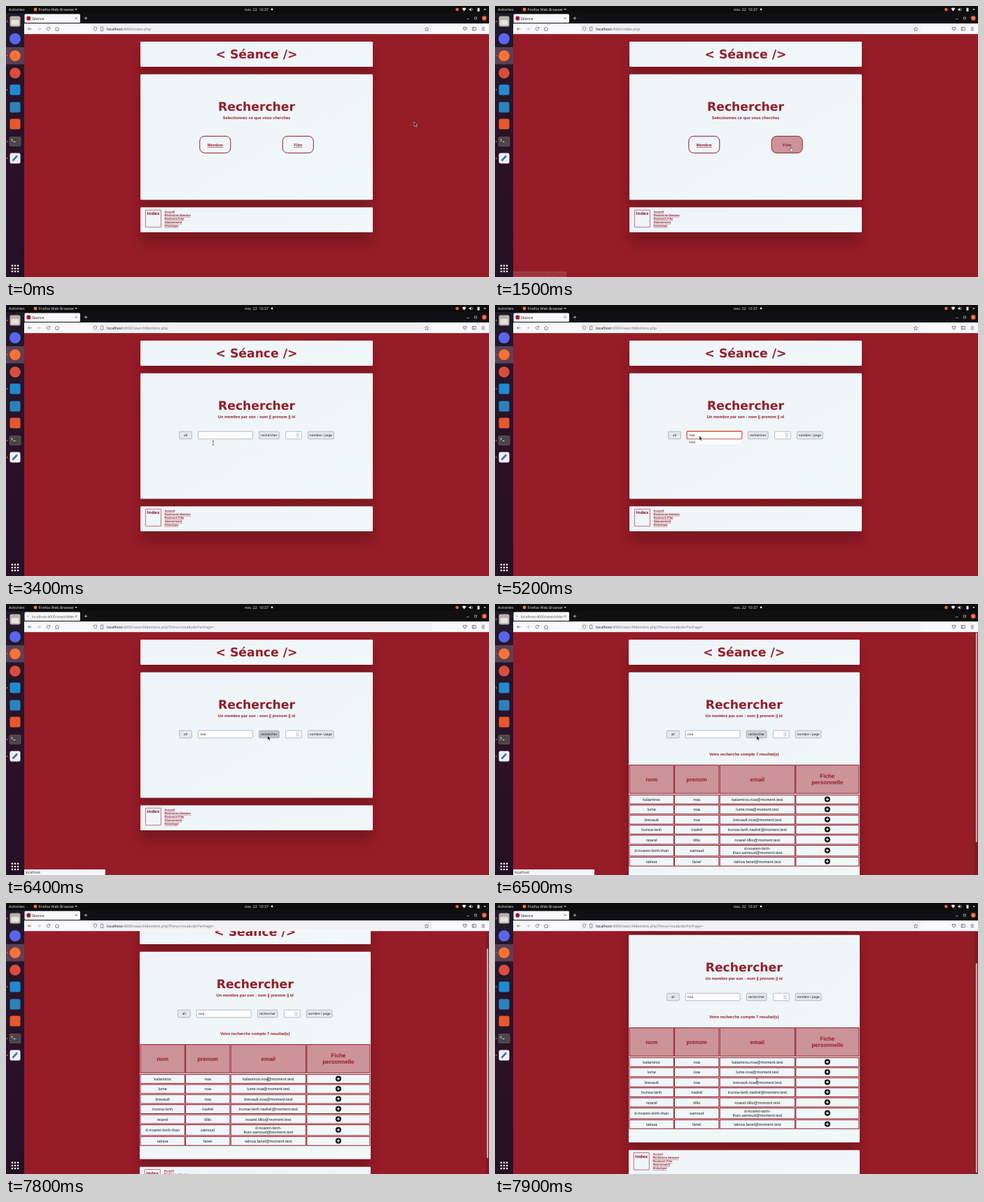
These frames come from a looping animation (690x388 px, 8 s). An HTML page:

```html
<!DOCTYPE html>
<html lang="fr">
<head>
<meta charset="utf-8">
<title>Séance</title>
<style>
html, body { margin: 0; width: 100%; height: 100%; overflow: hidden; background: #961c28; }
svg { display: block; width: 100vw; height: 100vh; }
text { font-family: "Noto Sans", "Open Sans", sans-serif; text-rendering: geometricPrecision; white-space: pre; }
.page { font-family: "Liberation Sans", Arial, sans-serif; fill: #222; }
.bold { font-family: "Liberation Sans", Arial, sans-serif; font-weight: 700; fill: #961c28; }
.title { font-family: "DejaVu Sans", sans-serif; font-weight: 700; fill: #961c28; }
.link { text-decoration: underline; }
.mid { text-anchor: middle; }
</style>
</head>
<body>
<svg viewBox="0 0 690 388" preserveAspectRatio="none">
  <defs>
    <linearGradient id="dockFill" x2="0" y2="1"><stop stop-color="#201a29"/><stop offset=".55" stop-color="#2b1128"/><stop offset="1" stop-color="#241024"/></linearGradient>
    <linearGradient id="panelFill" x2="1" y2="1"><stop stop-color="#eef4fa"/><stop offset="1" stop-color="#f0f8f8"/></linearGradient>
    <filter id="blur" x="-20%" y="-60%" width="140%" height="220%"><feGaussianBlur stdDeviation="8"/></filter>
    <clipPath id="viewport"><path d="M26 40H690V388H26Z"/></clipPath>
    <clipPath id="tabClip"><path d="M28 11H97V25H28Z"/></clipPath>
  </defs>
  <g id="page" clip-path="url(#viewport)"></g>
  <g id="desktop"></g>
  <g id="browser"></g>
  <g id="pointer"></g>
</svg>
<script>
const LOOP = 8000, STEP = 100;
const RED = '#961c28', PINK = '#cb9499';
const QUERY = 'noa';
const HOST = 'localhost';
const MAIL = '@moment.test';

const layer = id => document.getElementById(id);
const rect = (x, y, w, h, fill, extra = '') =>
  `<rect x="${x}" y="${y}" width="${w}" height="${h}" fill="${fill}" ${extra}/>`;
const circle = (x, y, r, fill, extra = '') => `<circle cx="${x}" cy="${y}" r="${r}" fill="${fill}" ${extra}/>`;
const line = (d, color, width = .7, extra = '') =>
  `<path d="${d}" fill="none" stroke="${color}" stroke-width="${width}" ${extra}/>`;
const text = (x, y, str, size, cls = '', extra = '') =>
  `<text x="${x}" y="${y}" font-size="${size}" class="${cls}" ${extra}>${str.replace(/&/g, '&amp;').replace(/</g, '&lt;')}</text>`;
const shift = (x, y, body) => `<g transform="translate(${x} ${y})">${body}</g>`;

// Desktop

function desktop() {
  const topBar = rect(0, 0, 690, 10, '#0c0c0c') +
    text(4, 7, 'Activities', 5.4, '', 'fill="#e6e6e6"') + circle(42, 5, 2.4, '#f57a2c') +
    text(46.5, 7, 'Firefox Web Browser', 5.25, '', 'fill="#e6e6e6"') +
    '<path d="M98.500 4h3.400l-1.700 2z" fill="#ddd"/>' +
    text(358, 7, 'nov. 22  10:37', 5.3, 'mid', 'fill="#e6e6e6"') + circle(380, 4.8, 1.4, '#eee') +
    circle(644.500, 5, 2.300, '#e8663a') +
    '<path d="M651.500 3.800q3-2.400 6 0l-3 3.800zM661.500 4h1.400l1.700-1.500v5l-1.700-1.500h-1.400zM673.500 2.700h3v5h-3zM682.300 4.200h3.400l-1.700 2z" fill="#e6e6e6"/>' +
    line('M666 3.300q1.500 1.700 0 3.400', '#ddd', .6);

  const dots = [22, 71, 120, 194, 218].map(y => circle(1.8, y, 1, '#e2572f')).join('');
  const square = (y, fill) => rect(5.500, y - 7.500, 15, 15, fill, 'rx="2.5"');
  const grid = [0, 1, 2].flatMap(i => [0, 1, 2].map(j =>
    rect(7.7 + i * 4.1, 370.600 + j * 4.1, 2.400, 2.400, '#f0edf0', 'rx=".7"'))).join('');
  const dock = rect(0, 10, 26, 378, 'url(#dockFill)') + rect(0, 59, 26, 24.5, '#5a4156') +
    square(22, '#b9b2aa') + rect(7.500, 20, 11, 7.500, '#e7e2dc', 'rx="1"') +
    circle(13, 47, 8, '#5865f2') + circle(13, 71.300, 7.800, '#ff7131') + circle(13, 96, 7.800, '#dd4b3c') +
    square(120, '#1f8ad2') + square(145, '#2a82bc') + square(169, '#e9572b') +
    rect(5, 187.500, 16, 13, '#4a4648', 'rx="1.5" stroke="#777" stroke-width=".5"') +
    line('M7.500 190.500l2 1.500-2 1.500M10.500 194.500h3', '#fff', .8) +
    square(218, '#eef1f5') + line('M9.500 221.500l6.500-7', '#3f6fb5', 2.600) + dots + grid;
  return topBar + dock;
}

// Browser window frame

const URLS = {
  home: ':4000/index.php',
  search: ':4000/searchMembre.php',
  results: `:4000/searchMembre.php?Perso=${QUERY}&nbrPerPage=`
};

function browser({ url, loading, status, statusAlpha }) {
  const tab = loading
    ? circle(31.500, 17.600, 1.1, '#999') + `<g clip-path="url(#tabClip)">${text(37, 19.5, HOST + ':4000/searchMembre', 5, '', 'fill="#555"')}</g>`
    : rect(29.500, 14.800, 5.600, 5.600, '#a3152d', 'rx="1.5"') + text(37, 19.5, 'Séance', 5.2, '', 'fill="#222"');
  const icon = '#55555c';
  const star = loading ? '' :
    line('M601 30l.9 1.900 2 .3-1.500 1.400.4 2.100-1.800-1-1.800 1 .4-2.100-1.500-1.400 2-.3z', icon, .6);
  const note = statusAlpha
    ? `<g opacity="${statusAlpha}">` + rect(26, 380, status === HOST ? 116 : 76, 8, '#f6f6f9', 'rx="1"') +
      text(27.5, 386, status, 5.1, '', 'fill="#333"') + '</g>' : '';
  return rect(26, 10, 664, 15, '#101012') + rect(26.500, 11.5, 79.500, 12.500, '#f9f9fb', 'rx="1.5"') + tab +
    line('M98.700 16l3 3m0-3l-3 3', '#444', .6) + line('M111.700 17.500h4.600M114 15.200v4.600', '#ddd') +
    line('M658 18.500h3.500M669.500 16h3v3h-3z', '#ddd', .6) +
    circle(683.300, 17.500, 3.400, '#e5542c') + line('M682 16.200l2.600 2.600m0-2.600l-2.600 2.600', '#fff', .6) +
    rect(26, 25, 664, 15.200, '#f9f9fb') + rect(122, 27, 486, 11.5, '#f1f1f4', 'rx="1.5"') +
    line('M36.500 32.800h-5m2.200-2.200l-2.200 2.200 2.200 2.200', icon) +
    line('M44.500 32.800h5m-2.200-2.200l2.200 2.200-2.200 2.200', '#b0b0b5') +
    line('M62.400 31.600a2.300 2.300 0 1 0 .2 1.800M62.800 30v1.900h-1.900', icon) +
    line('M70 32.800l3-2.600 3 2.600M71 32.300v3h4v-3', icon) +
    line('M125.400 30.800l2.200-.8 2.200.8q0 3.700-2.200 4.800-2.200-1.100-2.200-4.800zM135.500 30h3.300v5.500h-3.300z', icon, .6) +
    star + line('M653.200 30.500h4.800v2.500q-2.400 4-4.800 0zM654.400 32l1.200 1.200 1.200-1.200M666.200 30.500h5v4.500h-5zM668 30.500v4.500M679.500 30.800h4.500M679.500 32.800h4.500M679.500 34.800h4.500', icon, .7) +
    `<text x="144" y="34.700" font-size="5.350" fill="#77777d"><tspan fill="#18181b">${HOST}</tspan>${url.replace('&', '&amp;')}</text>` +
    note;
}

// Web page

const panel = (x, y, w, h) =>
  rect(x, y + 15, w, h, '#3a0810', 'opacity=".3" filter="url(#blur)"') +
  rect(x, y, w, h, 'url(#panelFill)', 'rx="1.2"');

function choice(x, label, hover) {
  return rect(x, 186.400, 44, 24, hover ? PINK : 'none', `rx="7" stroke="${RED}" stroke-width="1"`) +
    text(x + 22, 201.2, label, 5.75, 'bold mid' + (hover ? '' : ' link'));
}

function form({ value, focus, list, button }) {
  const frame = 'rx="1.3" stroke="#8f8f9d" stroke-width=".6"';
  const push = (x, w, label, fill = '#e6e9ec') =>
    rect(x, 181.2, w, 10.6, fill, frame) + text(x + w / 2, 188.2, label, 4.6, 'mid', 'fill="#111"');
  const ring = focus ? rect(274, 180.700, 78.800, 11.500, 'none', 'rx="1.4" stroke="#e4502f" stroke-width="1.2"') : '';
  const suggestion = list
    ? rect(274.300, 192.500, 78, 8.200, '#fff', 'stroke="#d8d8dc" stroke-width=".4"') + text(277, 198.4, QUERY, 5.1, '', 'fill="#222"') : '';
  return push(247.7, 17.700, 'all') + rect(274.500, 181.200, 78, 10.600, '#fff', frame) +
    text(277, 188.2, value, 4.8, '', 'fill="#222"') + ring +
    push(361.600, 28.600, 'rechercher', button) +
    rect(399.600, 181.200, 22.700, 10.600, '#fff', frame) + rect(414, 182.800, 5.400, 7.400, '#ececef') +
    line('M415.400 185.700l1.300-1.300 1.300 1.300M415.400 187.300l1.300 1.300 1.300-1.300', '#888', .5) +
    push(431.500, 36.700, 'nombre / page') + suggestion;
}

const MEMBERS = [
  ['kalamiros', QUERY], ['lume', QUERY], ['brevault', QUERY], ['trunoa-lanh', 'nadrel'],
  ['noarel', 'tillio'], ['d-noaren-binh-than', 'samoud'], ['talnoa', 'fanel']
];
const COLUMNS = [[192, 63.300], [256.600, 63.300], [321.200, 107.200], [429.800, 90]];

function table() {
  const cells = (y, h, fill) => COLUMNS.map(([x, w]) =>
    rect(x, y, w, h, fill, `stroke="${RED}" stroke-width="1"`)).join('');
  const center = i => COLUMNS[i][0] + COLUMNS[i][1] / 2;
  const head = (i, y, label) => text(center(i), y, label, 8.05, 'bold mid');
  const cell = (i, y, label) => text(center(i), y, label, 5.75, 'page mid');
  let out = cells(230.700, 40.500, PINK) + head(0, 254, 'nom') + head(1, 254, 'prenom') +
    head(2, 254, 'email') + head(3, 249.2, 'Fiche') + head(3, 258.4, 'personnelle');
  let y = 273.500;
  for (const [last, first] of MEMBERS) {
    const address = `${last}.${first}${MAIL}`;
    const long = last.length > 15;
    const h = long ? 15.300 : 12.800, mid = y + h / 2;
    out += cells(y, h, 'none') + cell(0, mid + 2.1, last) + cell(1, mid + 2.1, first);
    if (long) {
      const cut = address.lastIndexOf('-') + 1;
      out += cell(2, mid - 1, address.slice(0, cut)) + cell(2, mid + 5.3, address.slice(cut));
    } else out += cell(2, mid + 2.1, address);
    out += circle(center(3), mid - .3, 4, '#080808') +
      line(`M${center(3) - 2.2} ${mid - .3}h4.400m-2.200-2.200v4.400`, '#fff', 1.1);
    y += h + 1.6;
  }
  return out;
}

function footer() {
  const links = ['Accueil', 'Recherche Membre', 'Recherch Film', 'Abonnement', 'Historique'];
  return rect(199.300, 292.200, 22.100, 24.500, 'none', `stroke="${RED}" stroke-width=".6" rx=".5"`) +
    text(210.4, 299.2, 'Index', 5.8, 'title mid') +
    links.map((label, i) => text(226.5, 295.9 + i * 5, label, 4.05, 'bold link')).join('');
}

function page(s) {
  const found = s.view === 'results';
  const left = found ? 191 : 192, width = found ? 330 : 332;
  const extra = found ? 117.4 : 0, dx = found ? -2.3 : 0;
  const subtitle = s.view === 'home' ? 'Selectionnez ce que vous cherchez' : 'Un membre par son : nom || prenom || id';
  const main = text(358, 75, '< Séance />', 17.2, 'title mid') + text(358, 150.2, 'Rechercher', 17.2, 'title mid') +
    text(358, 161.6, subtitle, 5.75, 'bold mid') +
    (s.view === 'home' ? choice(276.800, 'Membre', s.hover === 'member') + choice(395.200, 'Film', s.hover === 'film') : form(s)) +
    (found ? text(358, 217, 'Votre recherche compte 7 resultat(s)', 5.75, 'bold mid') : '');
  const content = panel(left, 51, width, 36) + panel(left, 97.700, width, found ? 297 : 179.700) +
    panel(left, 288.300 + extra, width, 35.700) + shift(dx, 0, main) + (found ? table() : '') +
    shift(found ? -1.1 : 0, extra, footer());
  const bar = found
    ? rect(685.700, 40, 4.300, 348, '#7c1a26') + rect(686.800, 41 + s.scroll * .87, 2, 300, '#cfbcc1', 'rx="1"') : '';
  return rect(26, 40, 664, 348, RED) + shift(0, -s.scroll, content) + bar;
}

// Pointer

const PATH = [
  [0, 583, 166], [900, 583, 166], [1400, 422, 202], [1800, 422, 202], [2200, 299, 202],
  [3000, 299, 202], [3400, 296, 197.500], [3700, 292, 187.500], [5400, 292, 187.500],
  [5900, 373.800, 188.500], [7100, 373.800, 188.500], [7300, 374, 251], [7700, 374, 251], [7900, 374, 254]
];

function pointerAt(t) {
  const next = PATH.findIndex(k => k[0] > t);
  if (next < 0) return PATH.at(-1).slice(1);
  const [t0, x0, y0] = PATH[next - 1], [t1, x1, y1] = PATH[next];
  const u = (t - t0) / (t1 - t0), e = u * u * (3 - 2 * u);
  return [x0 + (x1 - x0) * e, y0 + (y1 - y0) * e];
}

const CURSORS = {
  arrow: '<path d="M0 0V6.200L1.500 4.900 2.600 7.200 3.700 6.700 2.700 4.500H4.500Z" fill="#111" stroke="#fff" stroke-width=".5"/>',
  hand: '<path d="M0 .5q.6-.8 1.100 0V2.600l2.300.6q.7.300.5 1.200L3.400 6.300H.6L-1.200 4q0-1 1.200-.3Z" fill="#fff" stroke="#222" stroke-width=".5"/>',
  beam: line('M-1.200-2.800H1.200M0-2.800V2.800M-1.200 2.800H1.200', '#333', .6)
};

// Timeline

function stateAt(t) {
  const [x, y] = pointerAt(t);
  const view = t < 3000 ? 'home' : t < 6500 ? 'search' : 'results';
  const inside = left => x >= left && x <= left + 44 && y > 186 && y < 211;
  const hover = view !== 'home' ? '' : inside(395) ? 'film' : inside(277) ? 'member' : '';

  let status = '', statusAlpha = 0;
  if (t >= 1500 && t < 2900) {
    status = `${HOST}:4000/search${t < 2100 ? 'Film' : 'Membre'}.php`;
    statusAlpha = t < 1600 ? .15 : 1;
  } else if ((t >= 2900 && t < 3100) || (t >= 6300 && t < 6700)) {
    status = HOST;
    statusAlpha = 1;
  }

  const typed = t < 4700 ? 0 : t < 4800 ? 1 : t < 5000 ? 2 : 3;
  const over = t >= 5800 && t < 7200;
  const cursor = hover ? 'hand' : (t >= 3400 && t < 4700) || t >= 7300 ? 'beam' : 'arrow';
  return {
    x, y, view, hover, status, statusAlpha, cursor,
    url: t < 2900 ? URLS.home : t < 6300 ? URLS.search : URLS.results,
    loading: (t >= 2900 && t < 3100) || (t >= 6300 && t < 6600),
    value: QUERY.slice(0, typed),
    focus: t >= 4500 && t < 6200,
    list: t >= 4700 && t < 6100,
    button: !over ? undefined : t >= 6100 && t < 6500 ? '#bfc3c7' : '#d0d3d7',
    scroll: t < 7800 ? 0 : t < 7900 ? 28 : 52
  };
}

let shown = -1;
function draw(now) {
  const t = Math.floor((now % LOOP) / STEP) * STEP;
  if (t !== shown) {
    shown = t;
    const s = stateAt(t);
    layer('page').innerHTML = page(s);
    layer('browser').innerHTML = browser(s);
    layer('pointer').innerHTML = shift(s.x, s.y, CURSORS[s.cursor]);
  }
}

layer('desktop').innerHTML = desktop();
const start = performance.now();
function tick() {
  draw(performance.now() - start);
  requestAnimationFrame(tick);
}
tick();
</script>
</body>
</html>
```
